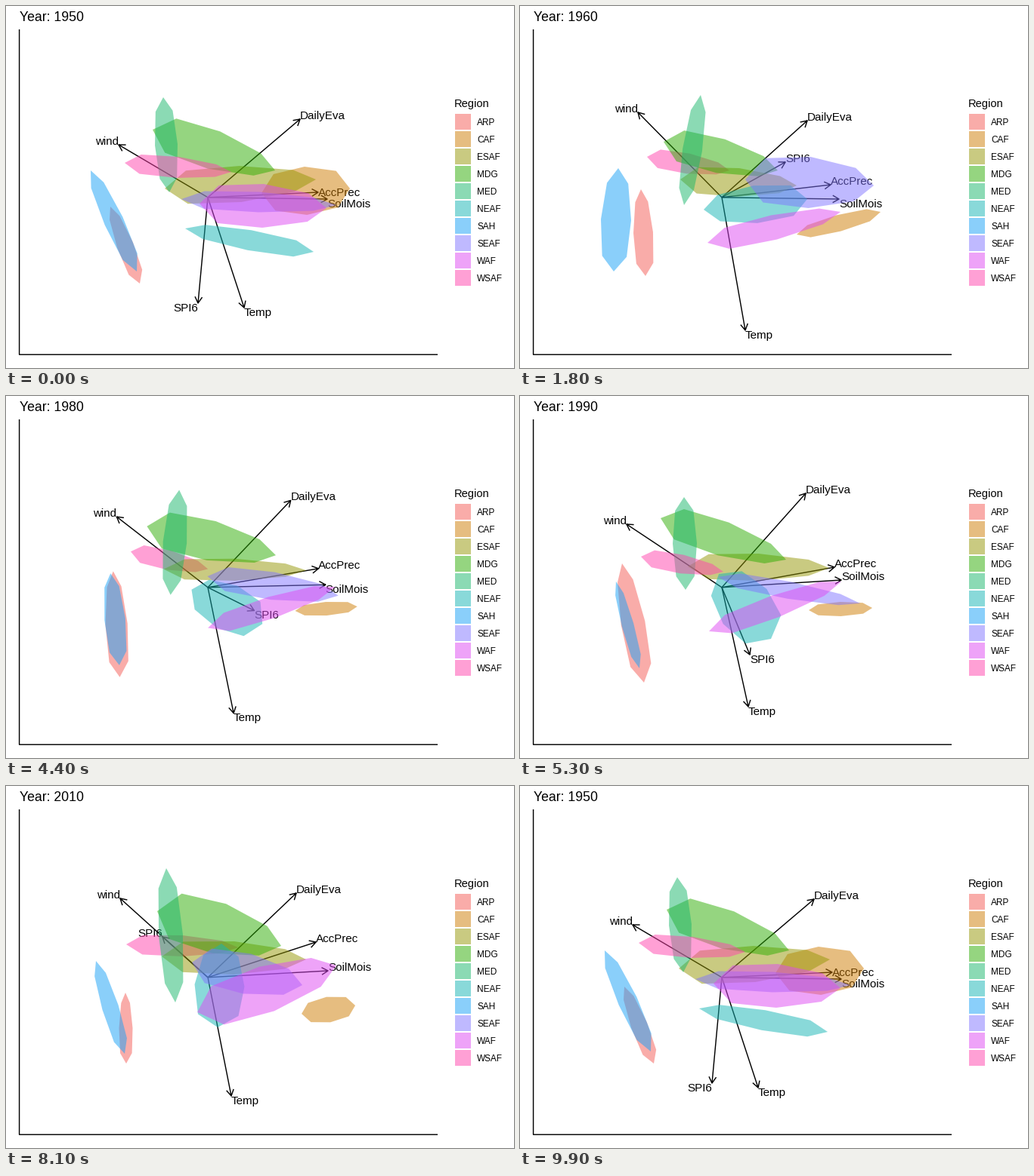
Animation, 672 px wide and 480 px high, one loop 10 s. Source, as a matplotlib script:

```python
import numpy as np
import matplotlib.pyplot as plt
from matplotlib.animation import FuncAnimation
from matplotlib.patches import Polygon, Rectangle

W, H, DPI = 672, 480, 96
ORIGIN = np.array([267, 253.8])
CENTRE = (294.5, 247)
plt.rcParams["font.family"] = "Liberation Sans"

# Steps of rest before each move, steps of each move, and how many steps
# into its outgoing move a year's pose is given
REST = [4, 3, 2, 3, 2, 3, 3, 3]
MOVE = [10, 11, 10, 10, 10, 9, 9, 7]
LEAD = [0, 1, 2, 0, 0, 1, 1, 0]
ARRIVE = np.cumsum(np.add(REST, MOVE))
LEAVE = ARRIVE - MOVE
COUNT = len(MOVE)

# Each row is a year: 1950, 1960, 1970, 1990, 2000, 2010
tips = {
    "wind": [(149, 184), (156, 141), (153, 148), (141, 170), (152, 181), (151, 149)],
    "DailyEva": [(389, 150), (380, 152), (375, 150), (378, 129), (390, 189), (384, 142)],
    "SPI6": [(254, 394), (351, 207), (358, 213), (304, 343), (291, 123), (207, 200)],
    "AccPrec": [(413, 247), (411, 237), (410, 231), (416, 227), (413, 247.5), (410, 207)],
    "SoilMois": [(425, 256), (422, 256), (420, 258), (425, 244), (427, 259), (426, 245)],
    "Temp": [(315, 400), (298, 430), (300, 431), (302, 412), (289, 423), (298, 411)],
}

# A blob is a spine from its blunt to its narrow end, and a width
colours, tapers, blobs = {}, {}, {}


def region(name, colour, taper, *rows):
    colours[name], tapers[name], blobs[name] = colour, taper, rows


region("ARP", "#f55b55", 0.2,
       (177, 368, 138, 266, 22), (166, 358, 160, 243, 26), (134, 364, 150, 245, 26),
       (164, 380, 135, 222, 32), (138, 402, 172, 210, 38), (159, 368, 158, 274, 18))
region("CAF", "#cf7d03", 0,
       (338, 248, 455, 242, 64), (366, 303, 477, 273, 22), (383, 286, 463, 277, 17),
       (382, 284, 466, 281, 19), (390, 270, 452, 280, 58), (391, 302, 462, 291, 34))
region("ESAF", "#959705", 0.3,
       (210, 242, 410, 230, 48), (212, 230, 366, 238, 38), (192, 234, 383, 235, 21),
       (222, 226, 409, 228, 36), (236, 180, 434, 224, 54), (206, 226, 397, 230, 44))
region("MDG", "#2dad03", 0.3,
       (194, 164, 356, 218, 52), (190, 180, 341, 218, 46), (187, 186, 363, 204, 62),
       (186, 162, 352, 217, 46), (199, 212, 348, 232, 58), (200, 166, 364, 212, 68))
region("MED", "#19b76b", 0,
       (208, 121, 216, 247, 30), (239, 118, 217, 264, 26), (244, 113, 216, 272, 31),
       (217, 134, 219, 257, 32), (241, 121, 214, 284, 36), (212, 109, 224, 287, 32))
region("NEAF", "#15b5b5", 0.1,
       (407, 326, 237, 295, 27), (380, 256, 243, 270, 50), (348, 278, 224, 282, 48),
       (332, 322, 263, 236, 74), (345, 286, 230, 268, 60), (280, 320, 285, 209, 66))
region("SAH", "#17a1f7", 0.1,
       (173, 352, 112, 218, 26), (124, 352, 130, 215, 40), (140, 352, 152, 222, 42),
       (158, 361, 127, 246, 16), (151, 334, 140, 156, 20), (157, 355, 119, 232, 22))
region("SEAF", "#8175ff", 0.2,
       (232, 256, 437, 264, 27), (298, 230, 468, 238, 68), (272, 238, 427, 252, 54),
       (262, 240, 450, 275, 23), (240, 278, 390, 274, 32), (246, 234, 392, 264, 54))
region("WAF", "#df49f3", 0.2,
       (256, 262, 424, 268, 58), (248, 314, 424, 273, 33), (288, 302, 448, 262, 28),
       (250, 312, 425, 246, 30), (252, 288, 428, 280, 78), (253, 300, 437, 238, 62))
region("WSAF", "#ff43ad", 0.3,
       (157, 208, 298, 220, 28), (168, 200, 277, 218, 27), (171, 198, 265, 225, 27),
       (160, 213, 269, 233, 25), (168, 196, 290, 212, 27), (159, 210, 307, 214, 28))


def timeline(rows):
    """Poses at rest for all years; 1980 and 2020 lie midway."""
    p = np.array(rows, float)
    poses = np.array([*p[:3], (p[2] + p[3]) / 2, *p[3:], (p[5] + p[0]) / 2])
    for k in reversed(range(COUNT)):
        after = poses[(k + 1) % COUNT]
        poses[k] -= (after - poses[k]) * LEAD[k] / (MOVE[k] - LEAD[k])
    return poses


tips = {name: timeline(rows) for name, rows in tips.items()}
blobs = {name: timeline(rows) for name, rows in blobs.items()}


def blend(poses, k, t):
    return poses[k] + (poses[(k + 1) % COUNT] - poses[k]) * t


def outline(blob, taper, corners=8):
    """Eight-sided leaf around a spine, fuller towards its start."""
    start, end, width = blob[:2], blob[2:4], blob[4]
    a = np.arange(corners) * 2 * np.pi / corners
    along = (1 - np.cos(a)) / 2
    side = np.sign(np.sin(a)) * np.abs(np.sin(a)) ** 0.8
    side *= width / 2 * (1 + taper * np.cos(a))
    spine = end - start
    normal = np.array([-spine[1], spine[0]]) / np.hypot(*spine)
    return start + np.outer(along, spine) + np.outer(side, normal)


def arrow(tip, size=9.6, spread=np.pi / 6):
    dx, dy = ORIGIN - tip
    angle = np.arctan2(dy, dx)
    arms = [tip + size * np.array([np.cos(angle + s), np.sin(angle + s)])
            for s in (-spread, spread)]
    return np.array([ORIGIN, tip, (np.nan, np.nan), arms[0], tip, arms[1]])


def place_label(label, tip, cap=10.9):
    """Push a label away from the middle of the panel."""
    x, y = tip
    label.set_ha("right" if x < CENTRE[0] else "left")
    if abs(y - CENTRE[1]) < 0.4:
        y += cap / 2
    elif y > CENTRE[1]:
        y += cap
    label.set_position((x, y))


fig = plt.figure(figsize=(W / DPI, H / DPI), dpi=DPI, facecolor="white")
ax = fig.add_axes([0, 0, 1, 1])
ax.set_xlim(0, W)
ax.set_ylim(H, 0)
ax.axis("off")

LINE = dict(color="black", lw=1.07, solid_capstyle="butt",
            solid_joinstyle="round", snap=False)
ax.plot([17.6, 17.6, 571], [31, 462.2, 462.2], **LINE)
title = ax.text(17.6, 20, "", fontsize=13.2)
ax.text(593, 134, "Region", fontsize=11)

patches = {}
for row, (name, colour) in enumerate(colours.items()):
    y = 153.4 + 23.04 * row
    style = dict(facecolor=colour, alpha=0.5, linewidth=0, zorder=4 + row)
    ax.add_patch(Rectangle((594, y - 10.55), 21.1, 21.1, **style))
    ax.text(623.3, y + 4.6, name, fontsize=8.8)
    patches[name] = ax.add_patch(Polygon([(0, 0)], **style))

arrows = {v: ax.plot([], [], zorder=2, **LINE)[0] for v in tips}
labels = {v: ax.text(0, 0, v, fontsize=11.38, zorder=3) for v in tips}


def update(frame):
    k = int(np.searchsorted(ARRIVE, frame))
    t = max(0, (frame - LEAVE[k]) / MOVE[k])

    year = 1950 + 10 * ((k + (t >= 0.5)) % COUNT)
    title.set_text(f"Year: {year}")
    for name, patch in patches.items():
        patch.set_xy(outline(blend(blobs[name], k, t), tapers[name]))
    # The last region slips down to second place while things move
    patches["WSAF"].set_zorder(4.5 if 0 < t < 1 else 13)

    for name, poses in tips.items():
        tip = blend(poses, k, t)
        arrows[name].set_data(*arrow(tip).T)
        place_label(labels[name], tip)
    return [title, *patches.values(), *arrows.values(), *labels.values()]


anim = FuncAnimation(fig, update, frames=100, interval=100, repeat=True,
                     repeat_delay=0, blit=False)
plt.show()
```
